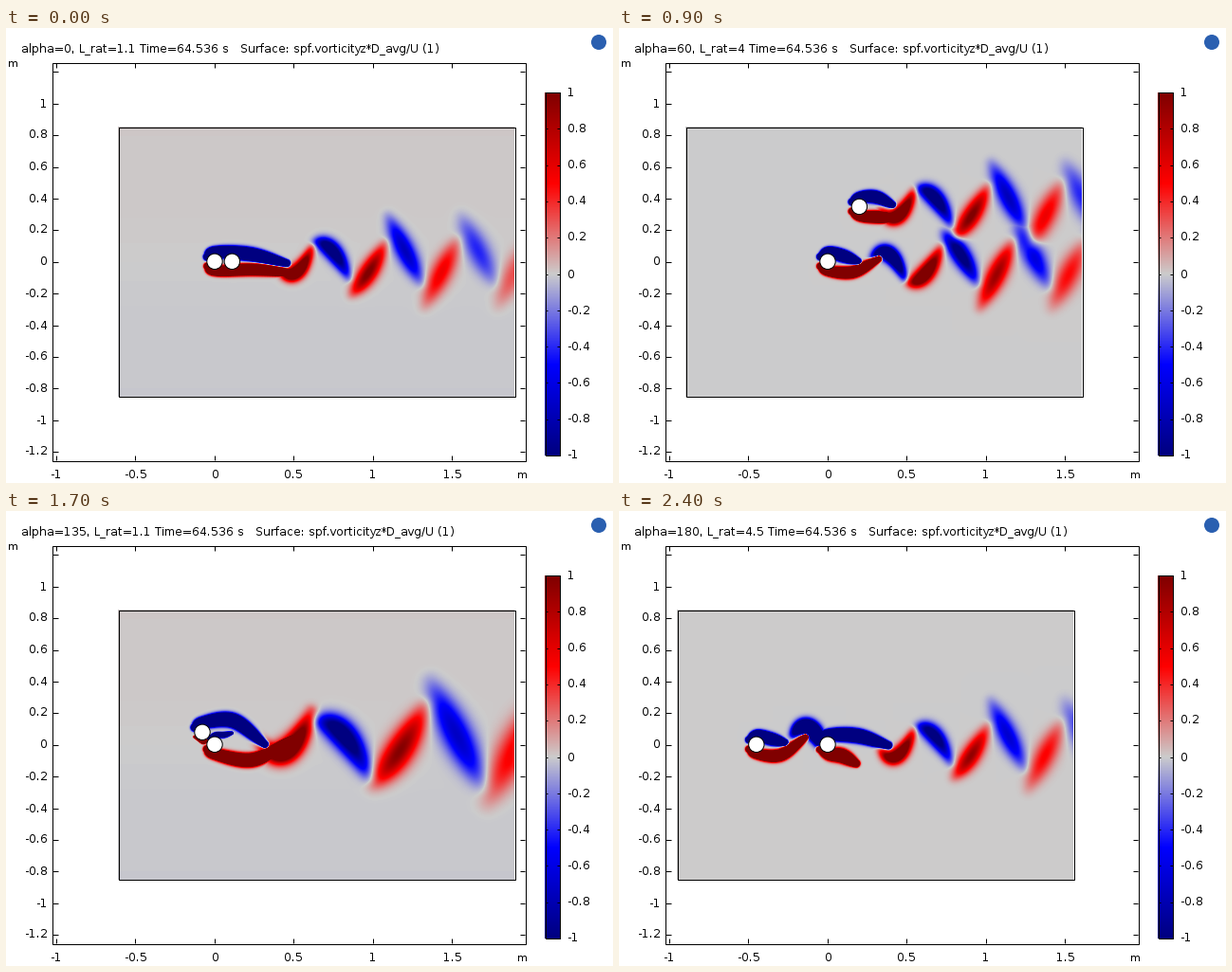
Animation of 640x480 px, one loop 2500 ms. Source, as a matplotlib script:

```python
import numpy as np
import matplotlib.pyplot as plt
from matplotlib.animation import FuncAnimation
from matplotlib.colors import LinearSegmentedColormap
from matplotlib.patches import Circle, Rectangle

plt.rcParams.update({
    "font.family": "DejaVu Sans", "font.size": 9,
    "text.hinting": "default", "text.hinting_factor": 1, "text.kerning_factor": 6,
})

W, H, DPI = 640, 480, 96
PX = 72 / DPI                      # one pixel in points
X0, Y0, SCALE = 220, 246.3, 167    # plot origin and pixels per metre
TOP, TALL, WIDE = 104, 285, 418    # flow domain in pixels
FRAMES = 25
RATIOS = [1.1, 1.5, 2, 2.5, 3, 3.5, 4, 4.5]
CASES = [(alpha, r) for alpha in range(0, 181, 15) for r in RATIOS]
WAVE = LinearSegmentedColormap.from_list("wave", ["#000080", "blue", "#cccccc", "red", "#800000"], 512)
RED, BLUE = 1, -1


def spline(points, n=80):
    """Catmull-Rom curve through the points."""
    p = np.array(points, float)
    p = np.vstack([2 * p[0] - p[1], p, 2 * p[-1] - p[-2]])
    t = np.linspace(0, len(points) - 1 - 1e-6, n)
    i = t.astype(int)
    f = (t - i)[:, None]
    a, b, c, d = (p[i + k] for k in range(4))
    return b + .5 * f * (c - a + f * (2 * a - 5 * b + 4 * c - d + f * (3 * (b - c) + d - a)))


def layer(sign, length, mid, end, width=4.2):
    """Shear layer wrapped round the cylinder and drawn out downstream."""
    path = spline([(-8, 5 * sign), (0, 10 * sign), (length / 2, mid), (length, end)])
    t = np.linspace(0, 1, len(path))
    yield sign, path, np.full_like(t, 8), width * (.55 + .45 * np.sin(np.pi * t ** 1.5))


def street(sign, x, y, step, gap, amp, bias=0, count=9):
    """Alternating vortices that fade, widen and turn upright downstream."""
    u = np.linspace(-1, 1, 80)
    bump = np.cos(np.pi * u / 2)
    size = step / 38
    for k in range(count):
        gain = 1 - sign * bias
        tall = size * min(10 + 8 * k, 34) / gain
        bend = size * max(16 - 6 * k, 0)
        path = np.column_stack([x + k * step + 17 * size * u,
                                y + sign * (gap - tall * u - bend * u ** 2)])
        width = size * min(7 + k, 12) * max(gain, 1)
        yield sign, path, amp * gain * .74 ** k * (.2 + .8 * bump), width * (.65 + .35 * bump)
        sign = -sign


def wakes(alpha, ratio):
    """Strokes shed by the upstream and by the downstream cylinder."""
    slant = min(alpha, 180 - alpha)
    if ratio >= 2 and slant >= 30:
        front = [layer(BLUE, 32, -6, 0), layer(RED, 54, 11, -3),
                 street(BLUE, 64, 3, 38, 11, 2.2)]
        if alpha <= 60:
            rear = [layer(BLUE, 35, -10, -2), layer(RED, 40, 11, 12),
                    street(RED, 40, 0, 39, 10, 1.9)]
        else:
            rear = [layer(BLUE, 56, -11, 10, 4.6), layer(RED, 32, 8, 4),
                    street(RED, 62, 0, 40, 9, 1.9)]
    elif ratio >= 3:
        front = [layer(BLUE, 30, -6, -2), layer(RED, 52, 11, -8),
                 street(BLUE, 56, -4, 38, 13, 4, 0, 1)]
        rear = [layer(BLUE, 64, -9, 1, 4.8), layer(RED, 30, 12, 20, 4.9),
                street(RED, 73, 1, 39, 11, 1.7)]
    elif alpha <= 15 or alpha == 180:
        front = [layer(BLUE, 76, -7.5, 2, 4.6), layer(RED, 82, 8.5, 12),
                 street(RED, 85, 0, 38.5, 12, 1.9)]
        rear = []
    elif alpha < 90:
        front = [layer(BLUE, 44, 2, 4, 3), layer(RED, 100, 14, 5),
                 street(RED, 103, -2, 45, 20, 1.5, .35)]
        rear = [layer(BLUE, 52, -12, 7, 5.6), layer(RED, 30, 8, 7)]
    elif alpha < 165:
        front = [layer(BLUE, 66, -12, 13, 4.9), layer(RED, 6, 9, 8, 1.8)]
        rear = [layer(BLUE, 18, -10, -12, 2), layer(RED, 82, 16, -6, 4.8),
                street(RED, 75, -2, 60, 9, 1.8)]
    else:
        front = [layer(BLUE, 105, -14, 0, 2.6), layer(RED, 26, 9, 0)]
        rear = [layer(BLUE, 78, -8, -13), layer(RED, 42, 8, 7),
                street(RED, 67, -2, 52, 14, 1.5, -.25)]
    return front, rear


def cylinders(alpha, ratio):
    """Pixel centres of both cylinders, the upstream one first."""
    a, d = np.radians(alpha), .1 * ratio * SCALE
    fixed = np.array([X0, Y0])
    other = fixed + d * np.array([np.cos(a), -np.sin(a)])
    return [fixed, other] if alpha <= 90 else [other, fixed]


def domain_left(ratio):
    return int(round(X0 - (.5 + .1 * ratio) * SCALE))


def sweep(sheet, path, amp, width):
    """Drag a Gaussian along a path, keeping the strongest value."""
    reach = 3 * width.max()
    lo = np.maximum(np.floor(path.min(0) - reach), 0).astype(int)
    hi = np.minimum(np.ceil(path.max(0) + reach), (WIDE, TALL)).astype(int)
    if np.any(hi <= lo):
        return
    dx = np.arange(lo[0], hi[0]) + .5 - path[:, :1]
    dy = np.arange(lo[1], hi[1]) + .5 - path[:, 1:]
    d2 = dx[:, None, :] ** 2 + dy[:, :, None] ** 2
    blob = (amp[:, None, None] * np.exp(-d2 / width[:, None, None] ** 2)).max(0)
    part = sheet[lo[1]:hi[1], lo[0]:hi[0]]
    np.maximum(part, blob, out=part)


def vorticity(alpha, ratio):
    corner = domain_left(ratio), TOP
    sheets = {RED: np.zeros((TALL, WIDE)), BLUE: np.zeros((TALL, WIDE))}
    for parts, centre_at in zip(wakes(alpha, ratio), cylinders(alpha, ratio)):
        for part in parts:
            for sign, path, amp, width in part:
                sweep(sheets[sign], path + centre_at - corner, amp, width)
    field = sheets[RED] - sheets[BLUE]
    if ratio <= 2:
        y = TOP + np.arange(TALL)[:, None]
        field += .012 * np.tanh((Y0 - y) / 60)
    return field


fig = plt.figure(figsize=(W / DPI, H / DPI), dpi=DPI, facecolor="white")
ax = fig.add_axes([0, 0, 1, 1])


def label(x, y, text, ha="left", size=9):
    return ax.text(x, y, text, ha=ha, va="baseline", fontsize=size)


def segment(x1, y1, x2, y2):
    ax.plot([x1, x2], [y1, y2], color="black", lw=PX, solid_capstyle="butt")


def box(x, y, w, h):
    return ax.add_patch(Rectangle((x, y), w, h, fill=False, ec="black", lw=PX, zorder=3))


def shade(data, *extent):
    return ax.imshow(data, cmap=WAVE, vmin=-1, vmax=1, aspect="auto",
                     interpolation="nearest", extent=extent)


def snap(v):
    return np.floor(v) + .5


flow = shade(np.zeros((TALL, WIDE)), 0, WIDE, TOP + TALL, TOP)
shade(np.linspace(1, -1, 383)[:, None], 568, 584, 451, 68)
ax.set(xlim=(0, W), ylim=(H, 0))
ax.axis("off")

box(48.5, 36.5, 499, 420)
for k in range(-6, 7):
    y = snap(Y0 - .2 * k * SCALE)
    segment(49, y, 55, y)
    segment(542, y, 547, y)
    if k < 6:
        label(44, y + 4, f"{k / 5:g}", "right")
for k in range(-2, 4):
    x = snap(X0 + .5 * k * SCALE - .6)
    segment(x, 451, x, 456)
    segment(x, 37, x, 42)
    label(x + 1, 475, f"{k / 2:g}", "center")
label(2, 41, "m", size=8.25)
label(539, 475, "m", size=8.25)

box(568.5, 67.5, 15, 383)
for k in range(-5, 6):
    y = snap(259 - 38.3 * k)
    segment(569, y, 571, y)
    segment(581, y, 584, y)
    label(592, y + 4, f"{k / 5:g}")

ax.add_patch(Circle((625, 15), 8, fc="#2a5fb0", ec="none"))

title = label(16, 26, "")
border = box(0, TOP + .5, WIDE, TALL - 1)
discs = [ax.add_patch(Circle((0, 0), 8.2, fc="white", ec="black", lw=PX, zorder=4))
         for _ in range(2)]

SWEEP = [CASES[k * (len(CASES) - 1) // (FRAMES - 1)] for k in range(FRAMES)]
FIELDS = [vorticity(*case) for case in SWEEP]


def update(k):
    alpha, ratio = SWEEP[k]
    left = domain_left(ratio)
    flow.set_data(FIELDS[k])
    flow.set_extent((left, left + WIDE, TOP + TALL, TOP))
    ax.set(xlim=(0, W), ylim=(H, 0))
    border.set_x(left + .5)
    for disc, pos in zip(discs, cylinders(alpha, ratio)):
        disc.center = tuple(pos)
    title.set_text(f"alpha={alpha}, L_rat={ratio:g} Time=64.536 s   "
                   "Surface: spf.vorticityz*D_avg/U (1)")
    return [flow, border, title, *discs]


anim = FuncAnimation(fig, update, frames=FRAMES, interval=100, repeat=True)
plt.show()
```
